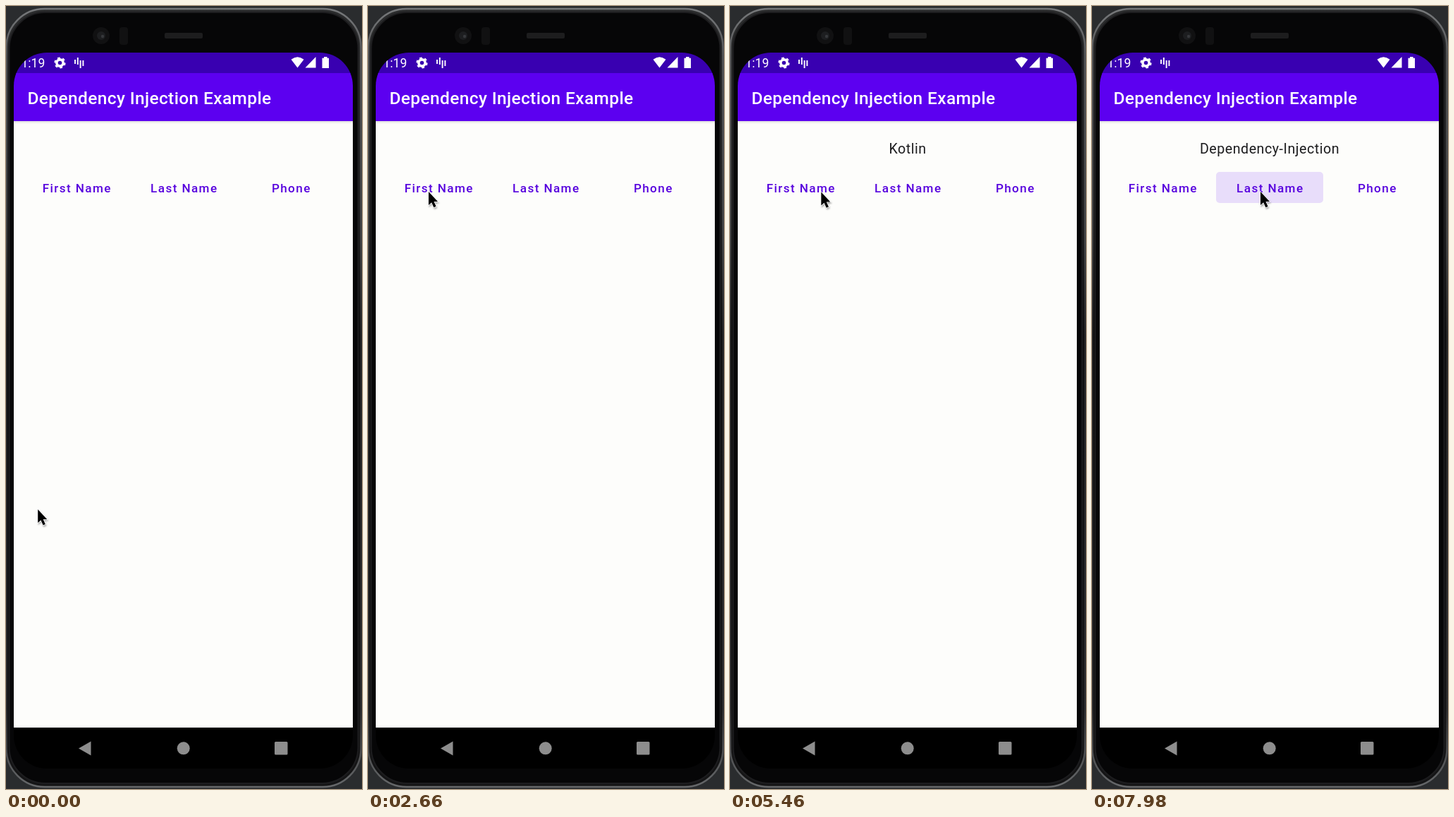
Write an HTML page that moves like this. It is 505x1109 px and loops after 8 s.

```html
<!DOCTYPE html>
<html lang="en">
<head>
<meta charset="utf-8">
<title>Dependency Injection Example</title>
<style>
  html, body { margin: 0; width: 100%; height: 100%; overflow: hidden; background: #2a2c2e; }
  svg { display: block; width: 100vw; height: 100vh; }
  text { font-family: Roboto, "Open Sans", sans-serif; }
  .title { font-size: 24.5px; font-weight: 500; letter-spacing: .36px; fill: #fff; }
  .button { font-size: 17.1px; font-weight: 500; letter-spacing: 1.4px; fill: #5600de; text-anchor: middle; }
  .result { font-size: 19.6px; letter-spacing: .54px; fill: #1c1c1e; text-anchor: middle; }
  .clock { font-size: 17.5px; fill: #fff; }
</style>
</head>
<body>
<svg viewBox="0 0 505 1109" preserveAspectRatio="none">
  <defs>
    <linearGradient id="rim" x2="0" y2="1">
      <stop offset="0" stop-color="#77797b"/>
      <stop offset=".06" stop-color="#555658"/>
      <stop offset=".3" stop-color="#434445"/>
      <stop offset=".42" stop-color="#232324"/>
      <stop offset=".9" stop-color="#2c2c2e"/>
      <stop offset="1" stop-color="#66686a"/>
    </linearGradient>
    <linearGradient id="metal" x2="0" y2="1">
      <stop offset="0" stop-color="#2b2c2d"/>
      <stop offset=".25" stop-color="#202021"/>
      <stop offset=".42" stop-color="#0b0b0c"/>
      <stop offset="1" stop-color="#151516"/>
    </linearGradient>
    <linearGradient id="barShadow" x2="0" y2="1">
      <stop offset="0" stop-opacity=".12"/>
      <stop offset="1" stop-opacity="0"/>
    </linearGradient>
    <clipPath id="screen"><rect x="11" y="66" width="481" height="1014" rx="47"/></clipPath>
    <filter id="shadow" x="-50%" y="-50%" width="220%" height="220%">
      <feDropShadow dx="1" dy="2" stdDeviation="1.3" flood-opacity=".35"/>
    </filter>
  </defs>

  <rect width="505" height="1109" fill="#2a2c2e"/>
  <rect x=".5" y="4" width="503" height="1102" rx="54" fill="url(#metal)" stroke="url(#rim)" stroke-width="2.500"/>
  <rect x="4.500" y="9" width="495" height="1092" rx="51" fill="#060607" stroke="#1d1d1f" stroke-width="2"/>

  <circle cx="135" cy="42" r="12" fill="#111112"/>
  <circle cx="135" cy="42" r="6" fill="#1d1e20"/>
  <circle cx="137" cy="43" r="2.200" fill="#37393c"/>
  <rect x="161" y="30" width="12" height="25" rx="4" fill="#111112"/>
  <rect x="225" y="38" width="54" height="8" rx="2" fill="#1d1d1e"/>

  <g clip-path="url(#screen)">
    <rect x="11" y="66" width="481" height="1014" fill="#000"/>
    <rect x="11" y="66" width="481" height="30" fill="#3900b1"/>
    <rect x="11" y="95" width="481" height="68" fill="#5c00f0"/>
    <rect x="11" y="163" width="481" height="859" fill="#fdfdfb"/>
    <rect x="11" y="163" width="481" height="4" fill="url(#barShadow)"/>

    <text class="clock" x="21.500" y="87">1:19</text>
    <g fill="none" stroke="#fff">
      <circle cx="76.500" cy="80.500" r="4.600" stroke-width="3.600"/>
      <circle cx="76.500" cy="80.500" r="6.900" stroke-width="2.400" stroke-dasharray="3.613"/>
      <path d="M98 76v6M101.800 73v10M105.600 77v11M109.400 77v8" stroke-width="1.900"/>
    </g>
    <path fill="#fff" d="M404.500 75.800Q413.500 68.500 422.500 75.800L413.500 87.500ZM439.500 72V87.500H424.500ZM448.500 73.700H451V72H455.500V73.700H458V88H448.500Z"/>
    <text class="title" x="30.500" y="139">Dependency Injection Example</text>

    <rect id="press0" x="24" y="235" width="152" height="44" rx="5" fill="#5c00f0" opacity="0"/>
    <rect id="press1" x="176" y="235" width="152" height="44" rx="5" fill="#5c00f0" opacity="0"/>
    <text class="button" x="100.800" y="263.500">First Name</text>
    <text class="button" x="252.800" y="263.500">Last Name</text>
    <text class="button" x="404.800" y="263.500">Phone</text>
    <text class="result" id="result" x="252" y="209.300"></text>

    <g fill="#8d8d8d">
      <path d="M103 1051.500L120.500 1041.500V1061.500Z"/>
      <circle cx="251.700" cy="1051.300" r="9"/>
      <rect x="381" y="1042" width="18.500" height="18.500" rx="1.500"/>
    </g>
  </g>

  <path id="cursor" filter="url(#shadow)" d="M0 0V19L4.200 15.300L7.400 22.300L10.600 20.900L7.500 14H13Z"
        fill="#000" stroke="#fff" stroke-width="1.200" paint-order="stroke"/>
</svg>
<script>
  const LOOP = 8000;
  const byId = id => document.getElementById(id);
  const cursor = byId("cursor"), result = byId("result");

  // time, x, y of the pointer tip
  const path = [
    [0, 45, 714], [300, 112, 410], [800, 103, 312], [1280, 100, 298],
    [1800, 100, 298], [2400, 86, 263], [4740, 85, 262],
    [5150, 85, 262], [6000, 231, 267], [6500, 231, 267], [7100, 239, 263], [LOOP, 239, 263]
  ];
  const presses = [
    { rect: byId("press0"), at: 4460, text: "Kotlin" },
    { rect: byId("press1"), at: 7760, text: "Dependency-Injection" }
  ];

  const clamp = v => Math.max(0, Math.min(1, v));
  const ease = v => v * v * (3 - 2 * v);

  function pointerAt(t) {
    const i = Math.max(1, path.findIndex(p => p[0] > t));
    const [t0, x0, y0] = path[i - 1], [t1, x1, y1] = path[i];
    const u = (t - t0) / (t1 - t0);
    // fast entry: steady at first, then slowing down
    const k = i === 1 ? u : i === 2 ? 1 - (1 - u) ** 3 : ease(u);
    return [x0 + (x1 - x0) * k, y0 + (y1 - y0) * k];
  }

  function draw(t) {
    const [x, y] = pointerAt(t);
    cursor.setAttribute("transform", `translate(${x.toFixed(2)} ${y.toFixed(2)})`);
    let label = "";
    for (const { rect, at, text } of presses) {
      const age = t - at;
      if (age >= 60) label = text;
      rect.setAttribute("opacity", .125 * clamp(age / 90) * (1 - clamp((age - 230) / 150)));
    }
    if (result.textContent !== label) result.textContent = label;
  }

  const start = performance.now();
  function tick() {
    draw((performance.now() - start) % LOOP);
    requestAnimationFrame(tick);
  }
  tick();
</script>
</body>
</html>
```
